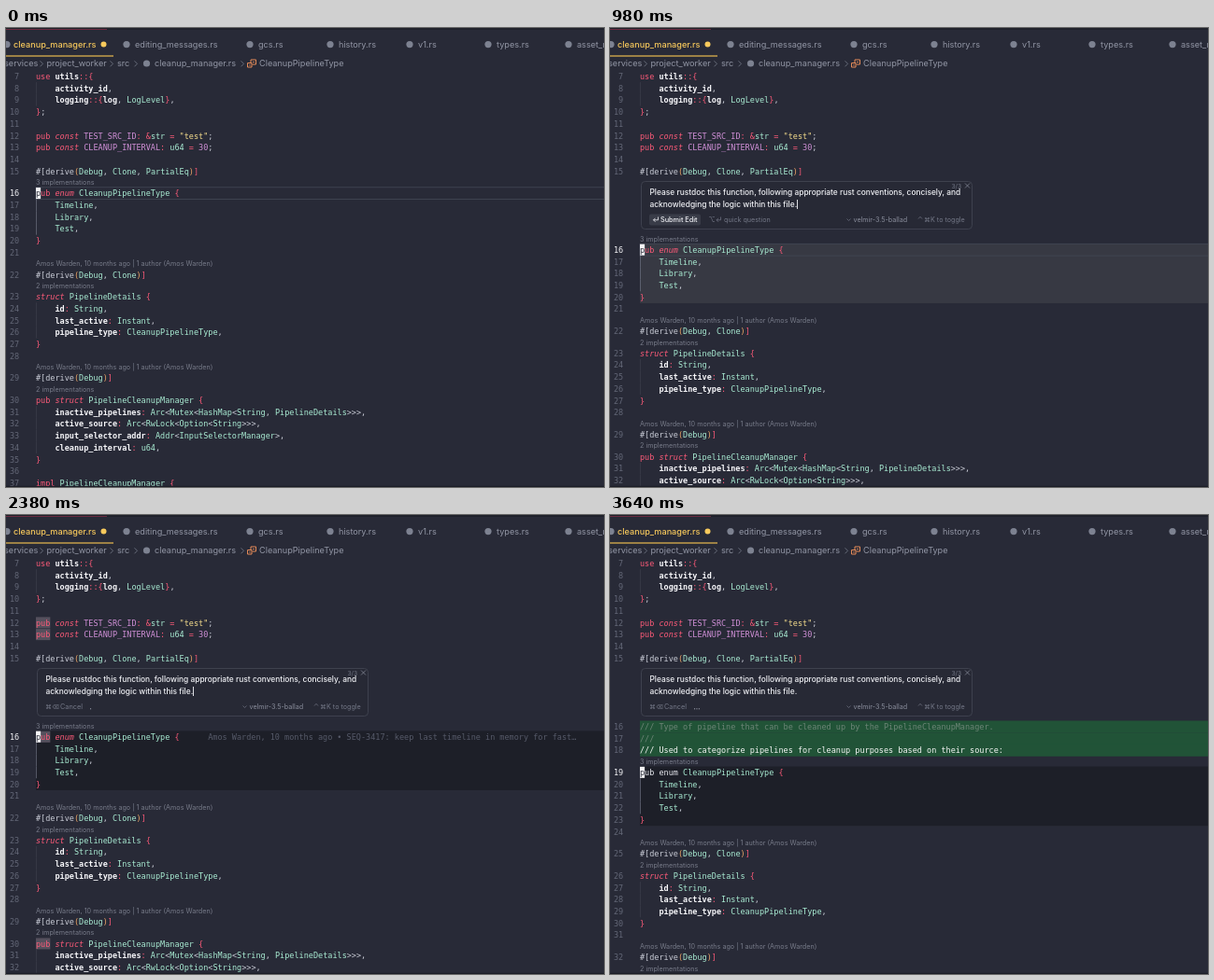
These frames come from a looping animation (640x492 px, 3710 ms). An HTML page:

```html
<!DOCTYPE html>
<html lang="en">
<head>
<meta charset="utf-8">
<title>Inline edit</title>
<style>
html, body { margin: 0; width: 100%; height: 100%; overflow: hidden; background: #282a37; }
svg { display: block; width: 100%; height: 100%; }
text { white-space: pre; font-family: Inter, "DejaVu Sans", sans-serif; }
.mono { font: 8.5px "DejaVu Sans Mono", monospace; }
.key { fill: #fb5a78; }
.decl { fill: #fb5a78; font-style: italic; }
.type { fill: #a9ecd3; }
.const { fill: #cf8fd6; }
.str { fill: #f4dc8c; }
.name { fill: #f7f7fa; font-weight: bold; }
.paren { fill: #f0a767; }
.plain { fill: #c9ccd6; }
.raw .key, .raw .decl { fill: #e9eaf0; font-style: normal; }
.raw .brace { fill: #fb5a78; }
.brace { fill: #fb5a78; }
</style>
</head>
<body>
<svg id="stage" viewBox="0 0 640 492"></svg>
<script>
const LOOP = 3710, TICK = 70;
const LEFT = 32, CHAR = 5.117, ROW = 12.72, LENS = 10.9, TOP = 45.4;
const AUTHOR = 'Amos Warden';
const BLAME = `${AUTHOR}, 10 months ago • SEQ-3417: keep last timeline in memory for fast…`;
const OWNER = `${AUTHOR}, 10 months ago | 1 author (${AUTHOR})`;

const head = `use utils::{
    activity_id,
    logging::{log, LogLevel},
};

pub const TEST_SRC_ID: &str = "test";
pub const CLEANUP_INTERVAL: u64 = 30;

#[derive(Debug, Clone, PartialEq)]`.split('\n');
const item = `pub enum CleanupPipelineType {
    Timeline,
    Library,
    Test,
}`.split('\n');
// Lines starting with "~" are code lenses.
const tail = `
~${OWNER}
#[derive(Debug, Clone)]
~2 implementations
struct PipelineDetails {
    id: String,
    last_active: Instant,
    pipeline_type: CleanupPipelineType,
}

~${OWNER}
#[derive(Debug)]
~2 implementations
pub struct PipelineCleanupManager {
    inactive_pipelines: Arc<Mutex<HashMap<String, PipelineDetails>>>,
    active_source: Arc<RwLock<Option<String>>>,
    input_selector_addr: Addr<InputSelectorManager>,
    cleanup_interval: u64,
}

impl PipelineCleanupManager {`.split('\n');
const docs = [
  '/// Type of pipeline that can be cleaned up by the PipelineCleanupManager.',
  '///',
  '/// Used to categorize pipelines for cleanup purposes based on their source:'
];

const esc = s => String(s).replace(/&/g, '&amp;').replace(/</g, '&lt;');
const rect = (x, y, w, h, fill, more = '') =>
  `<rect x="${x}" y="${y}" width="${w}" height="${h}" fill="${fill}" ${more}/>`;
const ui = (s, x, y, size, fill, more = '') =>
  `<text x="${x}" y="${y}" font-size="${size}" fill="${fill}" ${more}>${esc(s)}</text>`;
const mono = (s, x, y, fill, more = '') =>
  `<text class="mono" x="${x}" y="${y}" fill="${fill}" ${more}>${esc(s)}</text>`;
const path = (d, stroke, w = 0.8) =>
  `<path d="${d}" fill="none" stroke="${stroke}" stroke-width="${w}"/>`;

const kinds = [
  ['str', '"[^"]*"'],
  ['decl', '\\b(?:enum|struct|const)\\b'],
  ['key', '\\b(?:use|pub|impl)\\b|[:&=]'],
  ['brace', '[{}\\]]'],
  ['plain', '\\bderive\\b'],
  ['const', '\\b[A-Z][A-Z0-9_]+\\b|\\b\\d+'],
  ['type', '\\b[A-Z]\\w*|\\b(?:u64|str)\\b'],
  ['name', '[a-z_]\\w*'],
  ['paren', '[()]'],
  ['plain', '[^\\w"{}\\]:&=()]+']
];
const lexer = new RegExp(kinds.map(k => `(${k[1]})`).join('|'), 'g');

function code(s, y, raw) {
  const spans = [...s.matchAll(lexer)].map(m => {
    const kind = kinds[m.slice(1).findIndex(g => g !== undefined)][0];
    return `<tspan class="${kind}">${esc(m[0])}</tspan>`;
  });
  return `<text class="mono${raw ? ' raw' : ''}" x="${LEFT}" y="${y}">${spans.join('')}</text>`;
}

function header() {
  const tabs = [['editing_messages.rs', 129], ['gcs.rs', 261], ['history.rs', 347],
    ['v1.rs', 432], ['types.rs', 516], ['asset_manager.rs', 602]];
  const dot = (x, y) => `<circle cx="${x}" cy="${y}" r="3.6" fill="#7d8291"/>`;
  const grey = '#9296a5';
  const crumb = (s, x) => ui(s, x, 41.3, 9.15, grey);
  const arrow = x => path(`M${x - 1.5} 35.3l3 3-3 3`, '#777b8a');
  let out = rect(0, 0, 640, 2, '#1f212b') + rect(0, 1, 108, 1, '#6b2b40');
  out += rect(0, 29.4, 115, 1.2, '#e9b94f');
  out += dot(1, 17.6);
  out += ui('cleanup_manager.rs', 8, 21.2, 9.15, '#f7c95c', 'font-weight="500"');
  out += '<circle cx="104.5" cy="17.6" r="3" fill="#f7c95c"/>';
  for (const [name, x] of tabs) out += dot(x, 17.6) + ui(name, x + 9, 21.2, 9.15, grey);
  out += crumb('services', -2) + crumb('project_worker', 43.5) + crumb('src', 119);
  out += crumb('cleanup_manager.rs', 159) + crumb('CleanupPipelineType', 271);
  out += [38, 113, 139, 253].map(arrow).join('') + dot(150.5, 38);
  out += path('M258.5 37.5h4.5v4.5h-4.5zM262 37v-3h5.5v5h-4', '#e48a58', 1);
  out += path('M264 36.5h2M260 39.8h1.8', '#e48a58');
  return out;
}

function panel(busy, caret, dots) {
  const dim = '#747887', white = '#f1f2f6', y = 208;
  let out = rect(33.5, 164.5, 354, 51, '#272935', 'rx="4" stroke="#3e414e" stroke-width="1"');
  out += ui('3/3', 365.5, 172, 6.6, dim) + path('M380 166.5l5 5m0-5l-5 5', '#8d91a0', 0.7);
  out += ui('Please rustdoc this function, following appropriate rust conventions, concisely, and',
    42.5, 179.2, 8.4, white, 'font-weight="500"');
  out += ui('acknowledging the logic within this file.', 42.5, 192, 8.4, white, 'font-weight="500"');
  if (caret) out += rect(200, 184, 0.9, 10, white);
  if (busy) {
    out += ui('⌘', 42, y, 7, dim) + ui('⌫', 49, y, 6.5, dim) + ui('Cancel', 58, y, 7.3, dim);
    for (let i = 0; i < dots; i++) out += rect(90 + i * 2.4, 207.2, 1.1, 1.1, '#969aa8');
  } else {
    out += rect(42, 199.5, 55, 12, '#393c48', 'rx="2"');
    out += path('M51.5 202.5v3.3h-5m2-2l-2 2 2 2', white);
    out += ui('Submit Edit', 54, y, 7.3, white, 'font-weight="500"');
    out += ui('⌥', 105.5, y, 7, dim) + path('M118.5 202.5v3.3h-4.5m2-2l-2 2 2 2', dim, 0.7);
    out += ui('quick question', 122, y, 7.2, dim);
  }
  out += path('M253.5 204.5l2 2 2-2', dim, 0.7) + ui('velmir-3.5-ballad', 260.5, y, 7.2, '#8a8e9c');
  out += path('M330 204.5l2-2.2 2 2.2', dim, 0.7) + ui('⌘', 336, y, 6.8, dim);
  return out + ui('K to toggle', 343, y, 7.2, dim);
}

function menu(opacity) {
  const grey = '#8f93a1', white = '#f1f2f6', y = 222.3;
  return `<g opacity="${opacity}">` +
    rect(92.5, 208.5, 144, 21, '#262834', 'rx="3" stroke="#2c2f3b" stroke-width="1"') +
    ui('Chat', 100, y, 9.3, white) + ui('⇧', 124.5, y, 8, grey) + ui('⌘', 132, y, 8, grey) +
    ui('L', 141, y, 8.6, grey) + ui('Add to Edit', 156.5, y, 9.3, white) +
    path('M209.5 218l2.2-2.5 2.2 2.5', grey) + ui('⌘', 215.5, y, 8, grey) +
    ui('K', 224, y, 8.6, grey) + '</g>';
}

function editor(t) {
  const open = t >= 910, busy = t >= 1680;
  const added = t < 3570 ? 0 : t < 3640 ? 1 : 3;
  const picked = open || t < 210 ? 0 : t < 350 ? 2 : 4;
  const marks = t >= 1120 && !added;
  let back = '', front = '', y = TOP, num = 7;

  const lens = s => {
    front += ui(s, LEFT, y + 8.2, 7.2, '#777b89');
    y += LENS;
  };
  const number = active => {
    front += mono(num++, 14.2, y + 9.5, active ? '#f4f4f7' : '#636777', 'text-anchor="end"');
  };
  const line = (s, active, bright, raw) => {
    number(active);
    if (s.startsWith('    ')) back += rect(LEFT, y, 0.7, ROW, bright ? '#6c7080' : '#3b3e4b');
    if (marks && s.startsWith('pub')) back += rect(LEFT, y + 0.4, 3 * CHAR, 12, '#55505d');
    front += code(s, y + 9.5, raw);
    y += ROW;
  };

  head.forEach(s => line(s));
  if (open) y += 60.6;
  docs.slice(0, added).forEach((s, i) => {
    const last = i === added - 1;
    back += rect(LEFT, y, 608, ROW + 0.1, '#215337');
    number(false);
    front += mono(s, LEFT, y + 9.5, last ? '#f4f6f4' : '#6d8577',
      last ? 'font-weight="bold"' : 'font-style="italic"');
    y += ROW;
  });
  lens('3 implementations');

  const top = y;
  if (open) back += rect(LEFT, top, 608, ROW * 5, busy ? '#1d1f28' : '#373943');
  if (!picked && !busy) back += rect(LEFT, top, 610, ROW, 'none', 'stroke="#414552" stroke-width="0.9"');
  item.forEach((s, i) => {
    if (i < picked) {
      back += rect(LEFT, y, (s.length + 1) * CHAR, ROW + 0.1, '#484d57');
      if (s[0] === ' ') front += mono('····', LEFT, y + 9.5, '#6b707c');
    }
    line(s, i === picked, true, added);
  });

  const cur = top + picked * ROW;
  front += rect(LEFT, cur + 0.3, CHAR, 12, '#f4f4f6');
  front += mono(item[picked][0], LEFT, cur + 9.5, '#282a37');
  if (t >= 560 && !open) front += mono(BLAME, LEFT + 7 * CHAR, cur + 9.5, '#565a69');
  if (t >= 1190 && !added) front += mono(BLAME, LEFT + 36 * CHAR, top + 9.5, busy ? '#565a69' : '#656977');

  tail.forEach(s => s[0] === '~' ? lens(s.slice(1)) : line(s));

  if (t >= 630 && !open) front += menu(t < 700 ? 0.6 : 1);
  if (open) {
    const caret = t < 1540 || (t >= 2030 && t < 2590) || (t >= 3080 && t < 3570);
    const dots = (Math.floor((t - 2379) / 186.8) + 9) % 4;
    front += panel(busy, caret, dots);
  }
  return back + front;
}

const stage = document.getElementById('stage');
const tabBar = header();
const begun = performance.now();
let shown = -1;

function draw(t) {
  stage.innerHTML = rect(0, 0, 640, 492, '#282a37') + tabBar + editor(t) + rect(0, 490.8, 640, 1.2, '#1b1d26');
}

function loop() {
  const t = Math.floor((performance.now() - begun) % LOOP / TICK) * TICK;
  if (t !== shown) draw(shown = t);
  requestAnimationFrame(loop);
}
loop();
</script>
</body>
</html>
```
